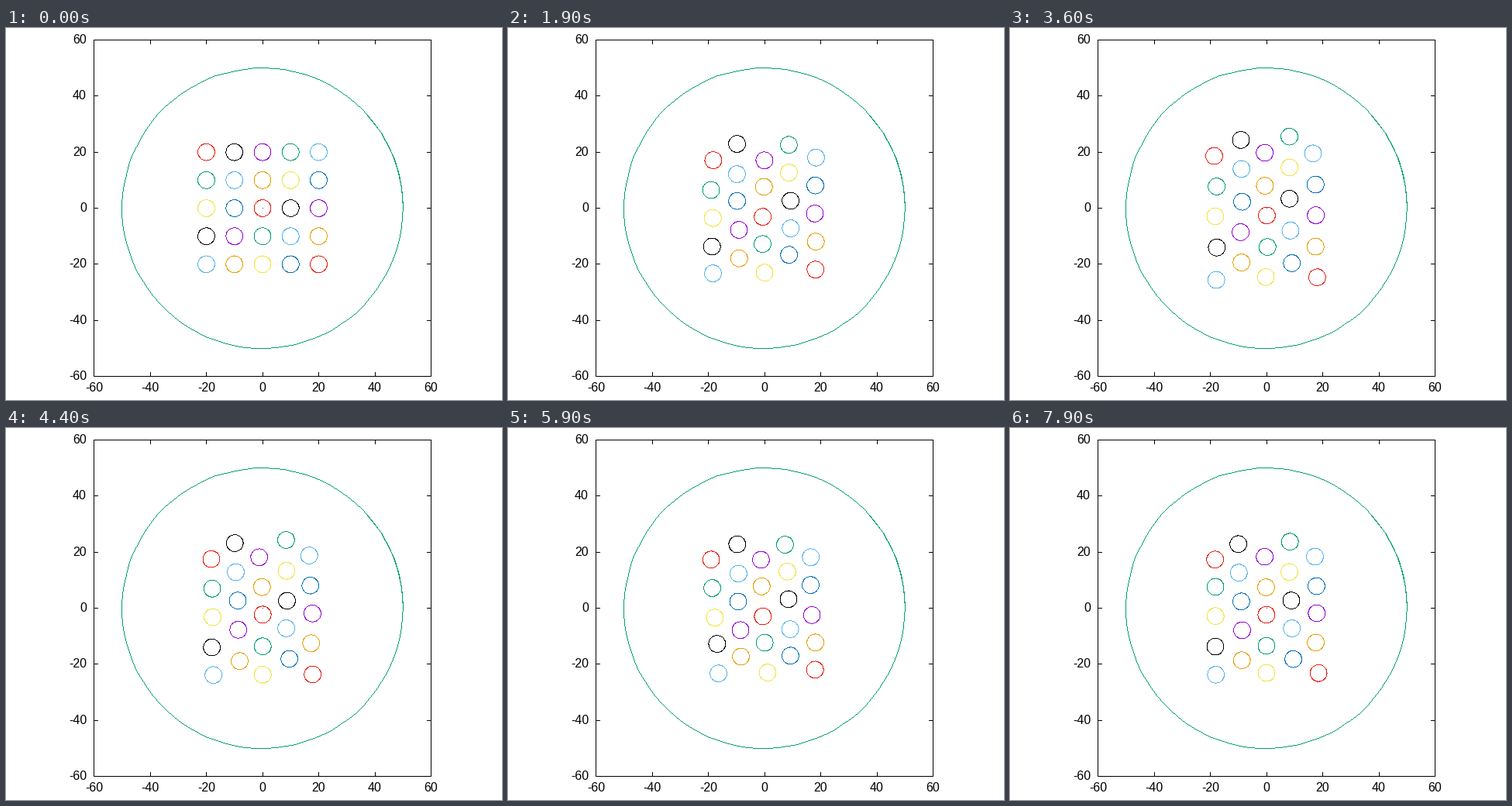
Recreate the animation shown at these times as a matplotlib script. Size 640x480 px, loop 8 s.

```python
import numpy as np
import matplotlib.pyplot as plt
from matplotlib.animation import FuncAnimation

W, H, DPI = 640, 480, 100
PX = 72 / DPI
FRAMES, STEP = 80, 100
LEFT, RIGHT, TOP, BOTTOM = 113, 548, 15, 449
SX, SY = (RIGHT - LEFT) / 120, (BOTTOM - TOP) / 120
COLORS = ["#9400d3", "#009e73", "#56b4e9", "#e69f00",
          "#f0e442", "#0072b2", "#e51e10", "#000000"]

plt.rcParams["font.family"] = "Liberation Sans"
plt.rcParams["path.simplify"] = False


def to_px(x, y):
    return LEFT + (x + 60) * SX, BOTTOM - (y + 60) * SY


# Motion: a square lattice relaxes into a triangular one and sways.
TIMES = np.array([0, 1900, 3600, 5100, 6700, 7900])
MODES = np.array([            # in pixels per row or column
    [0, 10, 10, 9.5, 9.5, 9.5],       # zigzag of neighbouring columns
    [0, 3, 4.3, 4.1, 4.8, 3.8],       # squeeze in x
    [0, 0, 4, -0.2, 1, 1.5],          # stretch in y
    [0, 0, -0.8, -1.3, -2, -1]]).T    # shear
SPEEDS = np.gradient(MODES, TIMES, axis=0)
SPEEDS[0] = 0


def modes(t):
    """Cubic Hermite curve through the key values."""
    k = min(np.searchsorted(TIMES, t, side="right") - 1, len(TIMES) - 2)
    span = TIMES[k + 1] - TIMES[k]
    u = (t - TIMES[k]) / span
    ease = u * u * (3 - 2 * u)
    return ((1 - ease) * MODES[k] + ease * MODES[k + 1]
            + span * u * (1 - u) ** 2 * SPEEDS[k]
            - span * u * u * (1 - u) * SPEEDS[k + 1])


# Particles run left to right, bottom row first.
row, col = (g.ravel() for g in np.mgrid[-2:3, -2:3])
home_x, home_y = to_px(10 * col, 10 * row)
rng = np.random.default_rng(4)
phase = rng.uniform(0, 2 * np.pi, (2, col.size))
rate = 2 * np.pi / rng.uniform(2500, 5000, (2, col.size))


def positions(t):
    zigzag, squeeze, stretch, shear = modes(t)
    sway_x, sway_y = 0.15 * zigzag * np.sin(rate * t + phase)
    side = np.where(col % 2, -1, 1)
    x = home_x - squeeze * col + shear * row - 0.1 * zigzag
    y = home_y + zigzag * (side - 0.09 * col) - stretch * row
    return zip(x + sway_x, y + sway_y)


# Drawing: lines are made of whole pixels, without smoothing.
def dashes(x, y):
    """One dash of a pixel's length for each point."""
    x, y = np.floor(np.asarray(x) + 0.5), np.floor(np.asarray(y) + 0.5)
    gaps = np.full_like(x, np.nan)
    return np.column_stack([x, x + 1, gaps]).ravel(), np.repeat(y + 0.5, 3)


def trace(x, y):
    """Pixel points along a polyline."""
    points = np.floor(np.column_stack([x, y]) + 0.5)
    parts = [np.linspace(a, b, int(np.abs(b - a).max()) + 1)
             for a, b in zip(points, points[1:])]
    return np.concatenate(parts).T


angle = np.linspace(0, 7, 100)


def ring(radius):
    return radius * SX * np.cos(angle), -radius * SY * np.sin(angle)


fig = plt.figure(figsize=(W / DPI, H / DPI), dpi=DPI, facecolor="white")
ax = fig.add_axes([0, 0, 1, 1])
ax.set_xlim(0, W)
ax.set_ylim(H, 0)
ax.axis("off")


def draw(x, y, color="black"):
    return ax.plot(*dashes(x, y), color=color, lw=PX, snap=False,
                   solid_capstyle="butt")[0]


def label(x, y, value, align):
    ax.text(x, y, str(value), ha=align, va="baseline", fontsize=16 * PX)


for v in range(-60, 61, 20):
    x, y = to_px(v, v)
    for edge, d in ((TOP, 5), (BOTTOM, -5)):
        draw(*trace([x, x], [edge, edge + d]))
    for edge, d in ((LEFT, 5), (RIGHT, -5)):
        draw(*trace([edge, edge + d], [y, y]))
    label(x + 0.5, 469, v, "center")
    label(104, y + 5, v, "right")
draw(*trace([LEFT, RIGHT, RIGHT, LEFT, LEFT],
            [TOP, TOP, BOTTOM, BOTTOM, TOP]))

cx, cy = to_px(0, 0)
draw([cx], [cy], COLORS[0])
wall_x, wall_y = ring(50)
draw(*trace(cx + wall_x, cy + wall_y), COLORS[1])

ring_x, ring_y = ring(3)
particles = [draw(x + ring_x, y + ring_y, COLORS[(k + 2) % 8])
             for k, (x, y) in enumerate(positions(0))]


def update(frame):
    for particle, (x, y) in zip(particles, positions(frame * STEP)):
        particle.set_data(*dashes(x + ring_x, y + ring_y))
    return particles


anim = FuncAnimation(fig, update, frames=FRAMES, interval=STEP,
                     repeat=True, repeat_delay=0)
plt.show()
```
